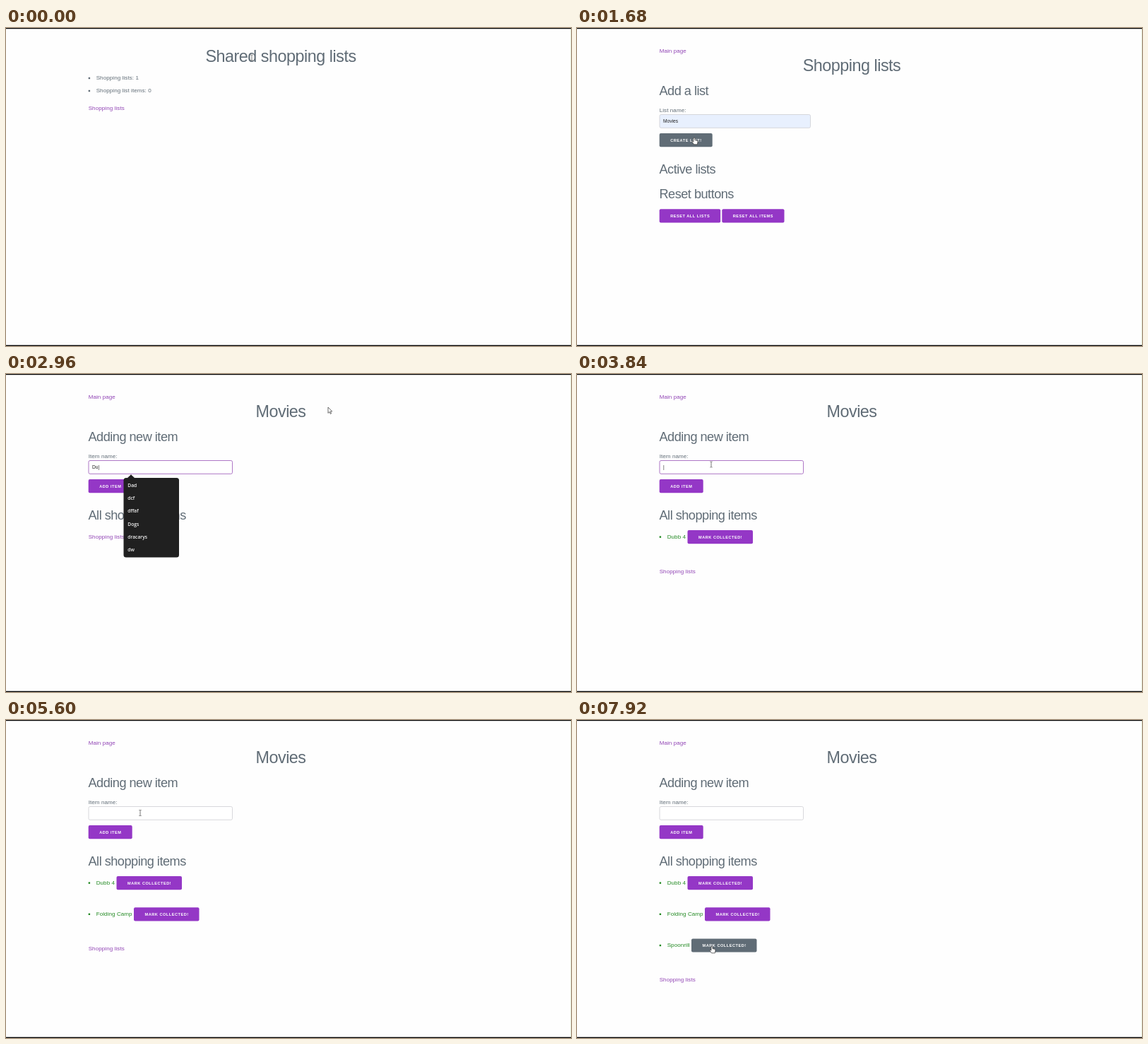
Animation, 800 px wide and 450 px high, one loop 8 s. Source, as an HTML page:

```html
<!DOCTYPE html>
<html lang="en">
<head>
<meta charset="utf-8">
<title>Shared shopping lists</title>
<style>
  html, body { margin: 0; height: 100%; overflow: hidden; background: #fefefe; }
  svg { display: block; width: 800px; height: 450px; }
  text { font: 8.04px "Liberation Sans", Arial, sans-serif; letter-spacing: .08px; fill: #606c76; white-space: pre; }
  .h1 { font-size: 23.4px; letter-spacing: -.5px; text-anchor: middle; }
  .h2 { font-size: 18.15px; letter-spacing: -.5px; }
  .link { fill: #9145b5; }
  .item { fill: #238a23; }
  .label { font-size: 5.6px; font-weight: 700; letter-spacing: .52px; fill: #fff; }
  .input { font-size: 6.67px; letter-spacing: 0; fill: #222; }
  .option { font: 600 6.7px "Open Sans", sans-serif; letter-spacing: 0; fill: #f2f2f2; }
</style>
</head>
<body>
<svg id="stage" viewBox="0 0 800 450"></svg>
<script>
const LOOP = 8000, ROW = 44.2;
const PURPLE = '#9437c6', GREY = '#606c76';

// Moments when pages load
const LISTS = 600, CREATED = 1740, MOVIES = 2300;
const ITEMS = [
  { at: 3520, name: 'Dubb 4', buttonX: 156.5 },
  { at: 5440, name: 'Folding Camp', buttonX: 181 },
  { at: 7580, name: 'Spoonrill', buttonX: 162 }
];
const FOCUS = [[930, 1300], [2580, 3520], [3740, 5440], [6320, 7580]];

// Start, delay per key, keys, moment the field is emptied
const TYPING = [
  [1000, 40, 'Movies', MOVIES],
  [2720, 150, 'Dubb 4', 3520],
  [4160, 50, 'Folding', 5440],
  [4960, 80, ' Camp', 5440],
  [6720, 30, 'Spo', 7580],
  [6880, 70, 'onrill', 7580]
];
const MENUS = [
  [2780, 3020, ['Dad', 'dcf', 'dffaf', 'Dogs', 'dracarys', 'dw']],
  [6750, 6880, ['Sports']]
];

// Time, x, y and the pointer shape from then on
const POINTER = [
  [0, 348, 42, 'beam'], [160, 300, 60, 'arrow'], [440, 142, 112, 'hand'],
  [LISTS, 142, 112, 'arrow'], [860, 170, 132, 'beam'], [1240, 170, 132, 'beam'],
  [1320, 168, 146, 'arrow'], [1400, 166, 155, 'hand'], [1840, 166, 155, 'arrow'],
  [2120, 140, 229, 'hand'], [MOVIES, 140, 229, 'arrow'], [2520, 190, 132, 'beam'],
  [2640, 190, 132, 'arrow'], [2900, 456, 47, 'arrow'], [3240, 456, 47, 'arrow'],
  [3440, 522, 4, 'arrow'], [3700, 190, 128, 'beam'], [4160, 190, 128, 'beam'],
  [4320, 190, 131.5, 'beam'], [6240, 190, 131.5, 'beam'], [6400, 188, 137, 'beam'],
  [7580, 188, 137, 'arrow'], [7800, 191, 320, 'hand'], [LOOP, 191, 320, 'hand']
];
const SHAPES = {
  beam: '<path d="M-1.6-4H-.5L0-3.5.5-4H1.6M0-3.5V3.5M-1.6 4H-.5L0 3.5.5 4H1.6" fill="none" stroke="#555" stroke-width=".8"/>',
  arrow: '<path d="M0 0V8.4L2-6.5 2 6.5 3.3 9.5 4.6 8.9 3.3 6H5.8Z" fill="#fff" stroke="#333" stroke-width=".7"/>'.replace('2-6.5 2 6.5', '2 6.5'),
  hand: '<path d="M-1 .6Q0-.6 1 .6V3.6L4.2 4.3Q5.2 4.7 5 6L4.4 9.8H-.4L-3 6.2Q-3.4 4.8-2 5.2L-1 6.2Z" fill="#fff" stroke="#333" stroke-width=".7"/>'
};

const within = (t, [from, to]) => t >= from && t < to;
const text = (x, y, words, kind = '') => `<text x="${x}" y="${y}" class="${kind}">${words}</text>`;
const rect = (x, y, w, h, fill, extra = '') =>
  `<rect x="${x}" y="${y}" width="${w}" height="${h}" fill="${fill}" ${extra}/>`;
const button = (x, y, w, words, fill = PURPLE) =>
  rect(x, y, w, 19.2, fill, 'rx="2"') + text(x + 15.5, y + 11.9, words, 'label');
const bullet = (y, fill) => rect(116.7, y - 3.6, 2.4, 2.4, fill);

function field(t, width, fill = '#fff') {
  const runs = TYPING.filter(run => within(t, [run[0], run[3]]));
  const focused = FOCUS.some(span => within(t, span));
  let value = '', lastKey = Math.max(0, ...FOCUS.map(f => f[0]).filter(at => at <= t));
  for (const [start, delay, keys] of runs) {
    const count = Math.min(keys.length, Math.floor((t - start) / delay) + 1);
    value += keys.slice(0, count);
    lastKey = Math.max(lastKey, start + (count - 1) * delay);
  }
  const caret = focused && (t - lastKey) % 500 < 250 ? '|' : '';
  const border = `rx="2" stroke="${focused ? '#9a55b8' : '#cfcfd4'}" stroke-width=".8"`;
  return rect(117, 122.5, width, 18.8, fill, border) + text(122, 134, value + caret, 'input');
}

function menu(options) {
  return '<path d="M171.5 147.5L177 142.3 182.5 147.5Z" fill="#202020"/>' +
    rect(166.5, 147, 78.5, 3.9 + 18.1 * options.length, '#202020', 'rx="3.5"') +
    options.map((name, i) => text(172.3, 160.2 + 18.1 * i, name, 'option')).join('');
}

function homePage() {
  return text(389, 48.2, 'Shared shopping lists', 'h1') +
    bullet(73.4, GREY) + text(127.7, 73.2, 'Shopping lists: 1') +
    bullet(91.4, GREY) + text(127.7, 91.2, 'Shopping list items: 0') +
    text(116.7, 116.3, 'Shopping lists', 'link');
}

function formPage(title, heading, label, section) {
  return text(116.7, 35.3, 'Main page', 'link') + text(389, 61.2, title, 'h1') +
    text(116.5, 94.8, heading, 'h2') + text(116.7, 118.8, label) +
    text(116.5, 206.2, section, 'h2');
}

function listsPage(t) {
  const created = t >= CREATED, shift = created ? 49 : 0;
  return formPage('Shopping lists', 'Add a list', 'List name:', 'Active lists') +
    field(created ? 0 : t, 213.5, within(t, [1240, CREATED]) ? '#e8f0fe' : '#fff') +
    button(116.7, 149, 75, 'CREATE LIST!', within(t, [1370, 1840]) ? GREY : PURPLE) +
    (created ? bullet(233, GREY) + text(127.7, 233, 'Movies', 'link') : '') +
    text(116.5, 241.2 + shift, 'Reset buttons', 'h2') +
    button(116.7, 256.2 + shift, 86.5, 'RESET ALL LISTS') +
    button(205.3, 256.2 + shift, 88.2, 'RESET ALL ITEMS');
}

function moviesPage(t) {
  const items = ITEMS.filter(item => t >= item.at);
  const rows = items.map(({ name, buttonX }, i) => {
    const y = 233 + ROW * i, hovered = i === 2 && t >= 7770;
    return bullet(y, '#238a23') + text(127.7, y, name, 'item') +
      button(buttonX, y - 12, 92.5, 'MARK COLLECTED!', hovered ? GREY : PURPLE);
  });
  const linkY = 232.8 + (items.length ? 5 : 0) + ROW * items.length;
  const open = MENUS.find(m => within(t, m));
  return formPage('Movies', 'Adding new item', 'Item name:', 'All shopping items') +
    field(t, 203.5) + button(116.7, 149, 62, 'ADD ITEM') + rows.join('') +
    text(116.7, linkY, 'Shopping lists', 'link') + (open ? menu(open[2]) : '');
}

function pointer(t) {
  const next = POINTER.findIndex(key => key[0] > t);
  const [t0, x0, y0, shape] = POINTER[next - 1], [t1, x1, y1] = POINTER[next];
  const p = (t - t0) / (t1 - t0), ease = p * p * (3 - 2 * p);
  return `<g transform="translate(${x0 + (x1 - x0) * ease} ${y0 + (y1 - y0) * ease})">${SHAPES[shape]}</g>`;
}

const stage = document.getElementById('stage');
function draw(now) {
  const t = now % LOOP;
  const page = t < LISTS ? homePage() : t < MOVIES ? listsPage(t) : moviesPage(t);
  stage.innerHTML = rect(0, 0, 800, 450, '#fefefe') + rect(799, 0, 1, 450, '#edf6e4') + page + pointer(t) +
    rect(0, 0, 800, 1.2, '#000') + rect(0, 448.7, 800, 1.3, '#000');
  requestAnimationFrame(draw);
}
requestAnimationFrame(draw);
</script>
</body>
</html>
```
